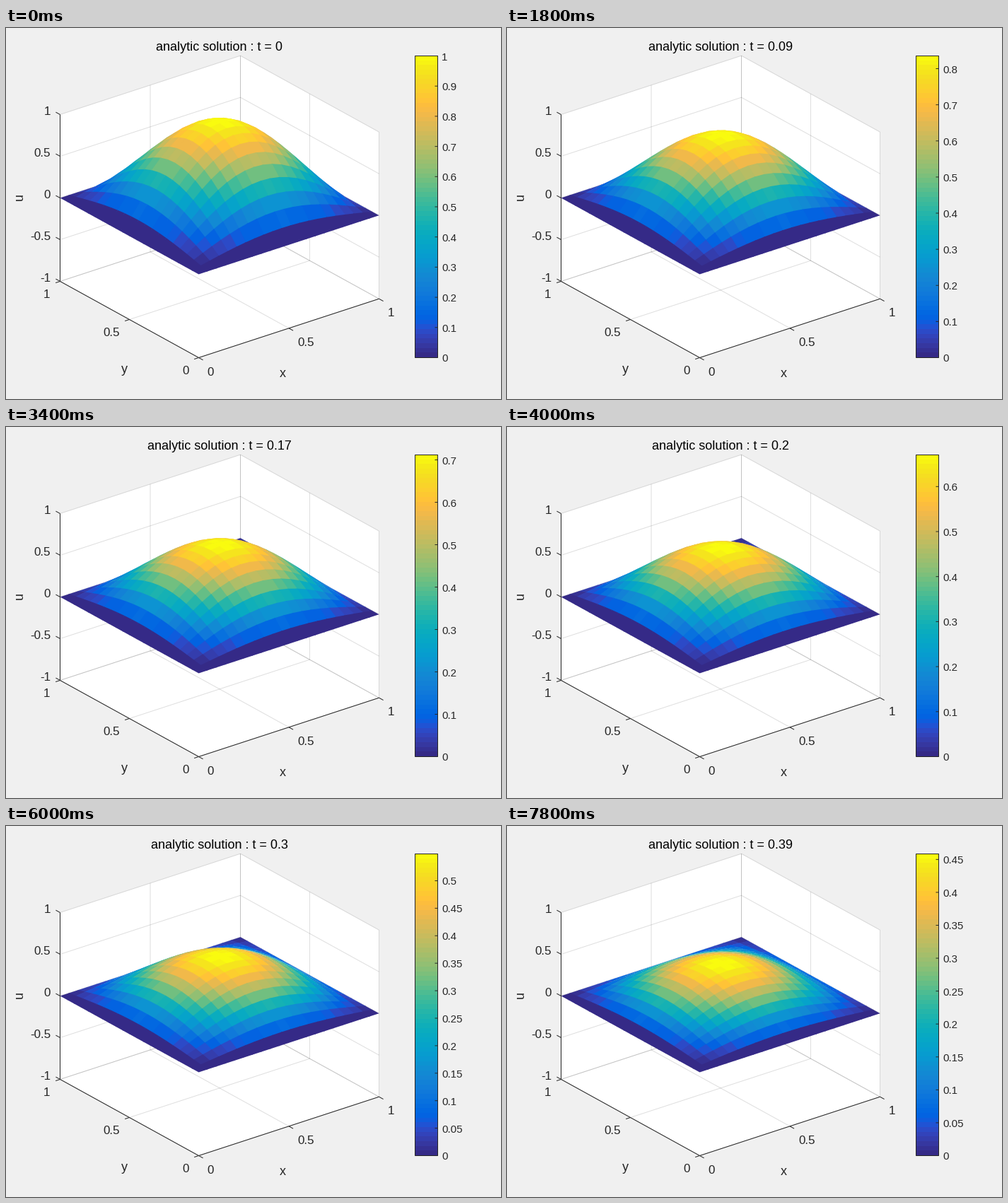
A matplotlib script that plays this animation: 700 px wide and 525 px high, repeating every 8 s.

```python
import numpy as np
import matplotlib.pyplot as plt
from matplotlib.animation import FuncAnimation
from matplotlib.collections import LineCollection, PolyCollection
from matplotlib.colors import LinearSegmentedColormap
from matplotlib.patches import Polygon, Rectangle

W, H, DPI = 700, 525, 100
PX = 72 / DPI
INK = "#262626"
N = 20
FRAMES, STEP_MS = 40, 200
BAR = (578.5, 610.5, 39.5, 466.5)  # left, right, top, bottom

# Colour stops: position among 64 levels -> colour
STOPS = {
    0: "#352a87", 2: "#3637a0", 4: "#3243ba", 5: "#2c4ac7", 6: "#2053d4",
    7: "#0f5cdd", 8: "#0363e1", 9: "#0268e1", 11: "#0871de", 13: "#1079da",
    16: "#1485d4", 18: "#108ed2", 20: "#0998d1", 22: "#06a0cd", 24: "#06a7c6",
    26: "#0aacbe", 28: "#15b1b4", 30: "#25b5a9", 33: "#42bb98", 35: "#59bd8c",
    37: "#71bf80", 40: "#92bf73", 44: "#b7bd64", 48: "#d9ba56", 50: "#e9b94e",
    51: "#f1b94a", 52: "#f8bb44", 53: "#fdbe3d", 54: "#ffc337", 56: "#fcce2e",
    59: "#f5de21", 61: "#f5eb18", 63: "#f9fb0e",
}
cmap = LinearSegmentedColormap.from_list(
    "surface", [(k / 63, c) for k, c in STOPS.items()], N=64)
levels = cmap(np.arange(64))


def project(x, y, z):
    """Orthographic view of the unit box in pixel coordinates."""
    px = 272.5 + 255 * x - 196 * y
    py = 348.5 - 83.3 * x - 108 * y - 118 * z
    return np.stack(np.broadcast_arrays(px, py), axis=-1)


def segment(a, b):
    return [project(*a), project(*b)]


def bump(x, y):
    return np.sin(np.pi * x) * np.sin(np.pi * y)


plt.rcParams["font.family"] = "Liberation Sans"
fig = plt.figure(figsize=(W / DPI, H / DPI), dpi=DPI, facecolor="#f0f0f0")
ax = fig.add_axes([0, 0, 1, 1])
ax.set_axis_off()


def label(x, y, s, size, color=INK, **kw):
    return ax.text(x, y, s, fontsize=size * PX, color=color, **kw)


def lines(segs, **kw):
    col = LineCollection(segs, linewidths=PX, colors=INK, snap=False, **kw)
    ax.add_collection(col)
    return col


# Box walls and grid
outline = [(0, 0, -1), (1, 0, -1), (1, 0, 1), (1, 1, 1), (0, 1, 1), (0, 1, -1)]
ax.add_patch(Polygon([project(*p) for p in outline], fc="white", lw=0, zorder=0))

halves = (0, 0.5, 1)
heights = (-1, -0.5, 0, 0.5, 1)
grid = []
for v in halves:
    grid += [segment((v, 0, -1), (v, 1, -1)), segment((v, 1, -1), (v, 1, 1)),
             segment((0, v, -1), (1, v, -1)), segment((1, v, -1), (1, v, 1))]
for z in heights:
    grid += [segment((0, 1, z), (1, 1, z)), segment((1, 0, z), (1, 1, z))]
lines(grid, alpha=0.15, zorder=1)

# Axis lines, ticks and tick labels
axes = [segment((0, 1, -1), (0, 1, 1)), segment((0, 0, -1), (0, 1, -1)),
        segment((0, 0, -1), (1, 0, -1))]
for v in halves:
    axes += [segment((v, 0, -1), (v, -0.031, -1)),
             segment((0, v, -1), (-0.025, v, -1))]
    label(284 + 256 * v, 492 - 83.5 * v, f"{v:g}", 17)
    label(259 - 196.5 * v, 490 - 108 * v, f"{v:g}", 17, ha="right")
for z in heights:
    axes.append(segment((0, 1, z), (0, 1.031, z)))
    label(63, 241 - 118 * z, f"{z:g}", 17, ha="right")
lines(axes, zorder=4)

label(391.5, 494, "x", 18, ha="center")
label(167.5, 488, "y", 18, ha="center")
label(19.5, 239.5, "u", 18, ha="center", va="center", rotation=90)
title = label(302, 32, "", 18, "black", ha="center")

# Surface: cells sorted from far to near, coloured by their first corner.
# Each reaches a little under its nearer neighbours so that no seam shows.
cells = sorted(((i, j) for i in range(N) for j in range(N)),
               key=lambda c: -(c[0] + c[1]))
I, J = np.array(cells).T
near_x, near_y = (np.maximum(k - 0.1, 0) / N for k in (I, J))
far_x, far_y = (I + 1) / N, (J + 1) / N
X = np.stack([near_x, far_x, far_x, near_x], axis=1)
Y = np.stack([near_y, near_y, far_y, far_y], axis=1)
Z = bump(X, Y)
shade = np.clip((bump(I / N, J / N) * 64).astype(int), 0, 63)
surface = PolyCollection([], facecolors=levels[shade], edgecolors="none",
                         linewidths=0, zorder=3)
ax.add_collection(surface)

# Colour bar
left, right, top, bottom = BAR
ax.imshow(levels[::-1, None, :], extent=(left, right, bottom, top),
          aspect="auto", interpolation="nearest", zorder=2)
ax.add_patch(Rectangle((left, top), right - left, bottom - top, fill=False,
                       ec=INK, lw=PX, snap=False, zorder=5))
bar_ticks = lines([], zorder=5)
bar_labels = [label(616, 0, "", 15) for _ in range(13)]

ax.set_xlim(0, W)
ax.set_ylim(H, 0)


def draw(frame):
    t = frame / 100
    peak = np.exp(-2 * t)
    title.set_text(f"analytic solution : t = {t:g}")
    surface.set_verts(project(X, Y, Z * peak))

    step = 0.1 if peak > 0.6 else 0.05
    count = int(peak / step + 1e-9) + 1
    ticks = []
    for k, text in enumerate(bar_labels):
        text.set_visible(k < count)
        if k < count:
            y = bottom - (bottom - top) * k * step / peak
            text.set_text(f"{k * step:.3g}")
            text.set_y(y + 6)
            ticks.append([(right - 4, y), (right, y)])
    bar_ticks.set_segments(ticks)
    return [title, surface, bar_ticks, *bar_labels]


anim = FuncAnimation(fig, draw, frames=FRAMES, interval=STEP_MS,
                     init_func=lambda: draw(0), repeat=True, repeat_delay=0,
                     blit=False)
plt.show()
```
